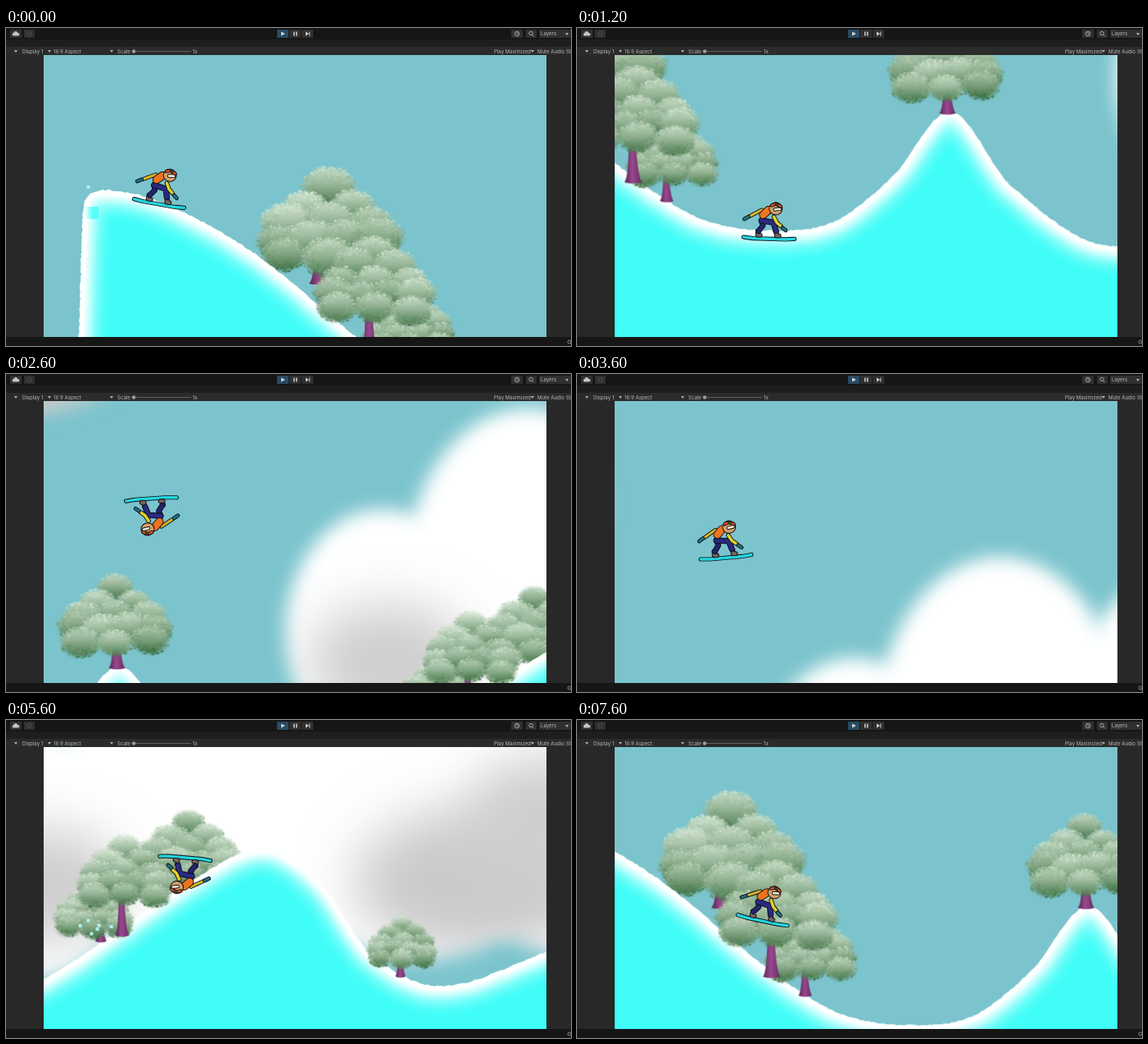
An HTML page with a canvas for the animation above (7.7 s loop, 690 by 388 pixels).

```html
<!DOCTYPE html>
<html lang="en">
<head>
<meta charset="utf-8">
<title>Snowboard run</title>
<style>
  html, body { margin: 0; width: 100%; height: 100%; overflow: hidden; background: #282828; }
  canvas, svg { position: absolute; left: 0; top: 0; }
  canvas { left: 46px; top: 33px; }
  text { font: 6.1px Inter, Roboto, sans-serif; fill: #b8b8b8; }
</style>
</head>
<body>
<svg width="690" height="388" viewBox="0 0 690 388">
  <path fill="#161616" d="M0 0H690V14H0ZM0 377H690V388H0Z"/>
  <path fill="#1e1e1e" d="M0 14H690V23H0Z"/>
  <path fill="#2b2b2b" d="M0 23H690V33H0Z"/>
  <path fill="#303030" d="M5 2h14v10H5ZM22 2h13v10H22ZM346 2h14v10h-14ZM361 2h14v10h-14ZM617 2h14v10h-14ZM635 2h13v10h-13ZM651 2h39v10h-39Z"/>
  <path fill="#294b63" d="M331 2h14v10h-14Z"/>
  <path fill="#d0d0d0" d="M336 4.500l5 2.500-5 2.500ZM351 4.500h1.500v5H351ZM354 4.500h1.500v5H354ZM366 4.500l4 2.500-4 2.500ZM370.300 4.500h1v5h-1Z"/>
  <path fill="#c4c4c4" d="M9 9.500a1.800 1.800 0 0 1 .3-3.500a2.600 2.600 0 0 1 5 0a1.800 1.800 0 0 1 .8 3.500Z"/>
  <g fill="none" stroke="#b0b0b0" stroke-width=".9">
    <circle cx="28.500" cy="7" r="2.500" stroke="#555"/>
    <circle cx="624" cy="7" r="2.800"/><path d="M624 5v2l1.500 1"/>
    <circle cx="641" cy="6.500" r="2.200"/><path d="M642.600 8.200l2 2"/>
    <path d="M156 28.500H226" stroke="#666"/>
  </g>
  <circle cx="156" cy="28.500" r="2.300" fill="#999"/>
  <path fill="#b0b0b0" d="M10 27h4l-2 3ZM51 27h4l-2 3ZM127 27h4l-2 3ZM641 27h4l-2 3ZM683 6h4l-2 3Z"/>
  <text x="20" y="30.500">Display 1</text>
  <text x="58" y="30.500">16:9 Aspect</text>
  <text x="136" y="30.500">Scale</text>
  <text x="228" y="30.500">1x</text>
  <text x="596" y="30.500">Play Maximized</text>
  <text x="649" y="30.500">Mute Audio</text>
  <text x="684" y="30.500">St</text>
  <text x="653" y="9.300">Layers</text>
  <circle cx="688" cy="383" r="2" fill="none" stroke="#888"/>
</svg>
<canvas id="view" width="614" height="344"></canvas>
<script>
const LOOP = 7700, RESPAWN = 6250, RESTART = 6850, LAG = 200;
const LEFT = -20, TOP = -240;
const view = document.getElementById('view').getContext('2d');

let seed = 7;
const rnd = () => (seed = seed * 16807 % 2147483647) / 2147483647;
const spread = r => (rnd() * 2 - 1) * r;

// Smooth interpolation through keys [t, v1, v2, ...].
function spline(keys, t) {
  const last = keys.length - 1;
  if (t <= keys[0][0]) return keys[0].slice(1);
  if (t >= keys[last][0]) return keys[last].slice(1);
  let i = 0;
  while (t >= keys[i + 1][0]) i++;
  const a = keys[i], b = keys[i + 1], h = b[0] - a[0], s = (t - a[0]) / h;
  const slope = (j, c) => j < 1 || j >= last ? 0 :
    (keys[j + 1][c] - keys[j - 1][c]) / (keys[j + 1][0] - keys[j - 1][0]);
  return a.slice(1).map((v, k) => {
    const c = k + 1;
    return v + (b[c] - v) * s * s * (3 - 2 * s) +
      h * s * (1 - s) * (slope(i, c) * (1 - s) - slope(i + 1, c) * s);
  });
}

// Rider: time, x, y, angle
const ride = [
  [-450, 142, 177, 0], [-200, 157, 207, 3], [0, 187, 214, 10], [750, 433, 327, 12],
  [1200, 610, 464, 2], [1750, 775, 366, -52], [2600, 870, 106, -184], [3430, 974, -20, -335],
  [4600, 1119, 214, -533], [5000, 1160, 360, -550], [5600, 1334, 271, -535],
  [5950, 1440, 226, -522], [6250, 1550, 300, -480]
];

// Snow surface: x, y
const hills = [
  [115, 198], [187, 212], [303, 275], [443, 389], [530, 442], [620, 455], [690, 444],
  [760, 390], [832, 310], [905, 400], [1025, 474], [1156, 422], [1340, 300], [1430, 259],
  [1500, 302], [1560, 387], [1645, 427], [1770, 387], [2100, 260]
];

function layer() {
  const c = document.createElement('canvas');
  c.width = 2260; c.height = 1200;
  const g = c.getContext('2d');
  g.translate(-LEFT, -TOP);
  return g;
}

function blob(g, x, y, rx, ry, fill) {
  g.fillStyle = fill;
  g.beginPath();
  g.ellipse(x, y, rx, ry, 0, 0, 7);
  g.fill();
}

function paintClouds() {
  const g = layer();
  g.filter = 'blur(11px)';
  blob(g, 1152, 268, 118, 150, '#fff');
  blob(g, 1330, 200, 150, 205, '#fff');
  blob(g, 1620, 190, 205, 205, '#fff');
  blob(g, 1850, 220, 230, 175, '#fff');
  blob(g, 650, -70, 200, 80, '#c8cacb');
  blob(g, 650, -110, 190, 75, '#f4f6f6');
  g.globalCompositeOperation = 'source-atop';
  g.filter = 'blur(32px)';
  blob(g, 1160, 305, 100, 70, '#cfcece');
  blob(g, 1690, 300, 150, 90, '#cccbcc');
  blob(g, 1765, 225, 85, 80, '#cfcfd0');
  return g.canvas;
}

// Light 0 to 1 as a leaf colour, from deep green to pale frost.
const leaf = (lit, alpha = 1) => {
  const l = Math.min(1, Math.max(0, lit));
  return `rgba(${62 + 150 * l | 0},${112 + 118 * l | 0},${66 + 144 * l | 0},${alpha})`;
};

function clump(g, x, y, rx, ry, lit) {
  const shade = g.createLinearGradient(0, y - ry, 0, y + ry);
  shade.addColorStop(0, leaf(lit + .45));
  shade.addColorStop(.45, leaf(lit + .15));
  shade.addColorStop(1, leaf(lit - .4));
  g.filter = 'blur(2px)';
  blob(g, x, y, rx * .95, ry * .95, shade);
  g.filter = 'none';
  for (let i = 0; i < rx * ry / 2; i++) {
    const a = rnd() * 6.283, d = Math.sqrt(.25 + rnd() * .9), s = .6 + rnd();
    const dy = Math.sin(a) * d;
    blob(g, x + Math.cos(a) * d * rx, y + dy * ry, s * 1.2, s, leaf(lit + .1 - dy * .42 + spread(.14), .6));
  }
}

function crown(g, x, y, w) {
  const rx = w / 2, ry = rx * .75;
  for (let row = 0; row < 5; row++) {
    const n = row < 4 ? row + 1 : 3, reach = .7 * Math.sin(row * .5);
    for (let i = 0; i < n; i++) {
      const cx = n > 1 ? reach * (i * 2 / (n - 1) - 1) : 0;
      const cy = -.67 + row * .32 + spread(.05), r = .33 + spread(.04);
      clump(g, x + cx * rx, y + cy * ry, r * rx, r * ry, .5 - row * .03 + spread(.12));
    }
  }
}

function trunk(g, x, top, base, w) {
  const tint = g.createLinearGradient(x - w / 2, 0, x + w / 2, 0);
  tint.addColorStop(0, '#5d2a5b');
  tint.addColorStop(.45, '#99488f');
  tint.addColorStop(1, '#6a2f62');
  g.fillStyle = tint;
  g.beginPath();
  g.moveTo(x - w * .3, top);
  g.quadraticCurveTo(x - w * .2, base - 8, x - w * .55, base);
  g.quadraticCurveTo(x, base + 3, x + w * .55, base);
  g.quadraticCurveTo(x + w * .2, base - 8, x + w * .1, top);
  g.fill();
}

function tree(g, x, y, w, rootX, rootY) {
  trunk(g, rootX, y, rootY, w * .135);
  crown(g, x, y, w);
}

function paintGround(g) {
  const p = new Path2D();
  for (let y = 960; y > 222; y -= 3) p.lineTo(94 - (y - 222) / 30 + spread(.8), y);
  p.lineTo(96, 211);
  p.lineTo(103, 202);
  for (let x = 115; x < 2250; x += 3) p.lineTo(x, spline(hills, x)[0] + spread(.8));
  p.lineTo(2260, 960);
  g.save();
  g.clip(p);
  g.fillStyle = '#40fdf8';
  g.fill(p);
  g.strokeStyle = '#fff';
  for (const [width, blur, alpha] of [[44, 8, .5], [24, 4, .8], [12, 1, .9]]) {
    g.lineWidth = width;
    g.filter = `blur(${blur}px)`;
    g.globalAlpha = alpha;
    g.stroke(p);
  }
  // Hard seam where the cliff edge meets the hilltop
  g.filter = 'none';
  g.globalAlpha = .8;
  const seam = g.createLinearGradient(96, 0, 106, 0);
  seam.addColorStop(0, '#40fdf800');
  seam.addColorStop(1, '#40fdf8');
  g.fillStyle = seam;
  g.fillRect(96, 218, 17, 15);
  g.restore();
}

function paintScene() {
  const g = layer();
  g.drawImage(paintClouds(), LEFT, TOP);
  tree(g, 394, 240, 172, 383, 312);
  tree(g, 1338, 262, 130, 1305, 325);
  paintGround(g);
  tree(g, 493, 362, 110, 485, 419);
  tree(g, 450, 310, 144, 444, 396);
  tree(g, 826, 249, 134, 828, 312);
  tree(g, 1222, 334, 94, 1231, 372);
  tree(g, 1260, 289, 116, 1257, 365);
  tree(g, 1599, 374, 84, 1597, 415);
  return g.canvas;
}

const scene = paintScene();

function line(width, color, ...points) {
  view.lineCap = view.lineJoin = 'round';
  view.beginPath();
  points.forEach(([x, y]) => view.lineTo(x, y));
  for (const [w, c] of [[width + 1.8, '#0b0d14'], [width, color]]) {
    view.lineWidth = w;
    view.strokeStyle = c;
    view.stroke();
  }
}

function drawRider([x, y, angle]) {
  view.save();
  view.translate(x, y);
  view.rotate(angle * Math.PI / 180);
  line(3.4, '#25d5dd', [-31, 0], [-20, 1], [20, 1], [31, 0]);
  line(4, '#75645f', [-14, -8], [-14, -3], [-11, -3]);
  line(4, '#75645f', [9, -8], [9, -3], [12, -3]);
  line(5, '#24246d', [-10, -21], [-8, -15], [-13, -8]);
  line(5.5, '#292a80', [-10, -21], [5, -19], [8, -9]);
  line(3, '#d4b52c', [-10, -34], [-17, -30], [-24, -26]);
  line(3, '#247184', [-26, -25], [-31, -22]);
  line(8.5, '#ed7420', [-2, -34], [-8, -28]);
  line(3.6, '#dfd02c', [5, -26], [9, -19], [14, -15]);
  line(3, '#247184', [16, -13], [20, -10]);
  // Head, goggles and striped cap
  blob(view, 7, -36, 8.5, 8, '#0b0d14');
  blob(view, 7, -36, 7.5, 7, '#d3a067');
  line(2.6, '#f5efdc', [6, -35], [12, -36]);
  line(2.6, '#d94e24', [2, -40], [7, -42], [13, -39]);
  line(1, '#4b9a3f', [7, -42], [9, -40]);
  view.restore();
}

// Snow puffs: birth, place and number of flakes
const puffs = [[-300, 115, 203, 1], [5200, 1226, 366, 6]];

function drawPuffs(t) {
  seed = 11;
  view.fillStyle = '#a9f0f0';
  for (const [born, x, y, n] of puffs) {
    const age = (t - born) / 400;
    if (age < 0 || age > 1.5) continue;
    for (let i = 0; i < n; i++) view.fillRect(x + spread(22) * age, y - (4 + rnd() * 24) * age, 4, 4);
  }
}

function frame(now) {
  const clock = Math.floor(now % LOOP / 100) * 100;
  const t = clock >= RESPAWN ? clock - RESTART : clock;
  const [x, y] = spline(ride, t - LAG);
  view.fillStyle = '#7cc4cd';
  view.fillRect(0, 0, 614, 344);
  view.save();
  view.translate(157 - x - 46, 207 - y - 33);
  view.drawImage(scene, LEFT, TOP);
  drawPuffs(t);
  drawRider(spline(ride, t));
  view.restore();
  requestAnimationFrame(frame);
}
requestAnimationFrame(frame);
</script>
</body>
</html>
```
